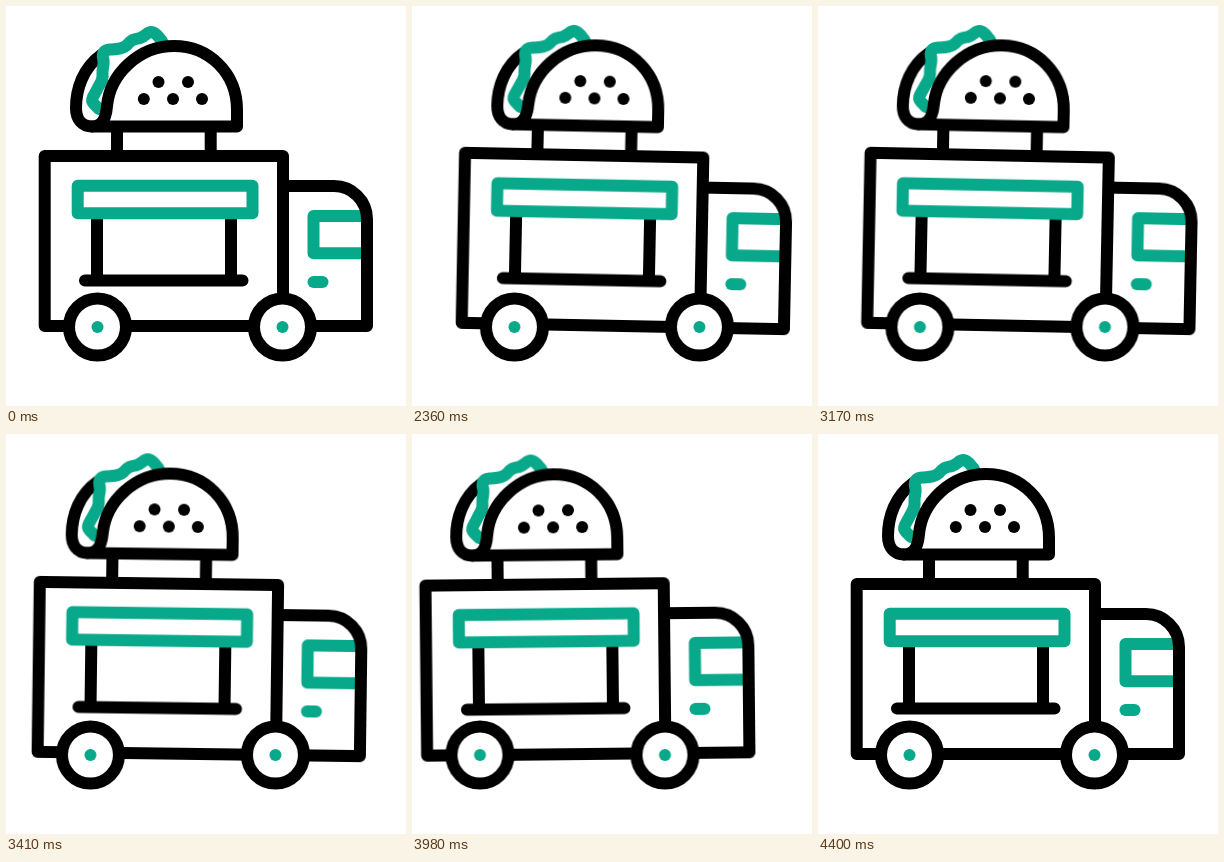
Write an HTML page without scripts that moves like this. It is 400 px wide and 400 px high and loops after 4430 ms.

```html
<!DOCTYPE html>
<html lang="en">
<head>
<meta charset="utf-8">
<title>Taco truck</title>
<style>
  html, body { margin: 0; width: 100%; height: 100%; overflow: hidden; background: #fff; }
  svg { display: block; width: 100%; height: 100%; }
  .line { fill: none; stroke: #000; stroke-width: 12; stroke-linecap: round; stroke-linejoin: round; }
  .green { stroke: #08a88a; }
  .filled { fill: #fff; }
  .hub { fill: #08a88a; }

  .truck, .body { animation: 4430ms cubic-bezier(.364, 0, .636, 1) infinite; }
  .truck { animation-name: drive; }
  .body { animation-name: rock; transform-origin: 200px 322px; }

  @keyframes drive {
    0%, 45.15% { transform: translateX(0); }
    62.87% { transform: translateX(25px); }
    87.25% { transform: translateX(-26.5px); }
    99.32%, 100% { transform: translateX(0); }
  }
  @keyframes rock {
    0%, 45.15% { transform: rotate(0deg); }
    51.92% { transform: rotate(1.25deg); }
    62.08% { transform: rotate(-1.3deg); }
    73.36% { transform: rotate(1.3deg); }
    85.1% { transform: rotate(-1.25deg); }
    95.71% { transform: rotate(.35deg); }
    99.32%, 100% { transform: rotate(0deg); }
  }
</style>
</head>
<body>
<svg viewBox="0 0 400 400">
  <defs>
    <g id="wheel">
      <circle class="line filled" r="28.5"/>
      <circle class="hub" r="6"/>
    </g>
  </defs>
  <g class="truck">
    <g class="body">
      <!-- cab and box -->
      <path class="line green" d="M358 210H307.500V247.300H358"/>
      <path class="line green" d="M307.500 276H316.500"/>
      <path class="line" d="M277 180H328A33 33 0 0 1 361 213V320H38.700V150H277V320"/>
      <!-- serving hatch -->
      <path class="line" d="M91 210V274.500M225 210V274.500M79 274.500H236.500"/>
      <rect class="line green" x="71.700" y="179.700" width="174.800" height="27.500"/>
      <!-- taco -->
      <path class="line" d="M111 121V150M204.700 121V150"/>
      <path class="line" d="M95 49C77 62 70 83 70 102C70 113 76 120.500 86 120.500"/>
      <path class="line green" d="M93 103L88 98Q85 95 87 91L95 76Q97 72 96.500 67C96 62 99 58 97 52C96 46 99 44 104 43.500C112 43 117 43 121 39C126 33 129 33 134 32C140 30 141 26 145 26C149 26 152 30 156 35"/>
      <path class="line filled" d="M86 120.500H231V104C231 67 203 40 168 40C133 40 104 68 101 100C100 113 96 120.500 86 120.500Z"/>
      <g>
        <circle cx="152.500" cy="76" r="6"/>
        <circle cx="182" cy="76" r="6"/>
        <circle cx="137.800" cy="93" r="6"/>
        <circle cx="167" cy="93" r="6"/>
        <circle cx="196" cy="93" r="6"/>
      </g>
    </g>
    <use href="#wheel" x="91.500" y="321"/>
    <use href="#wheel" x="276.500" y="321"/>
  </g>
</svg>
</body>
</html>
```
